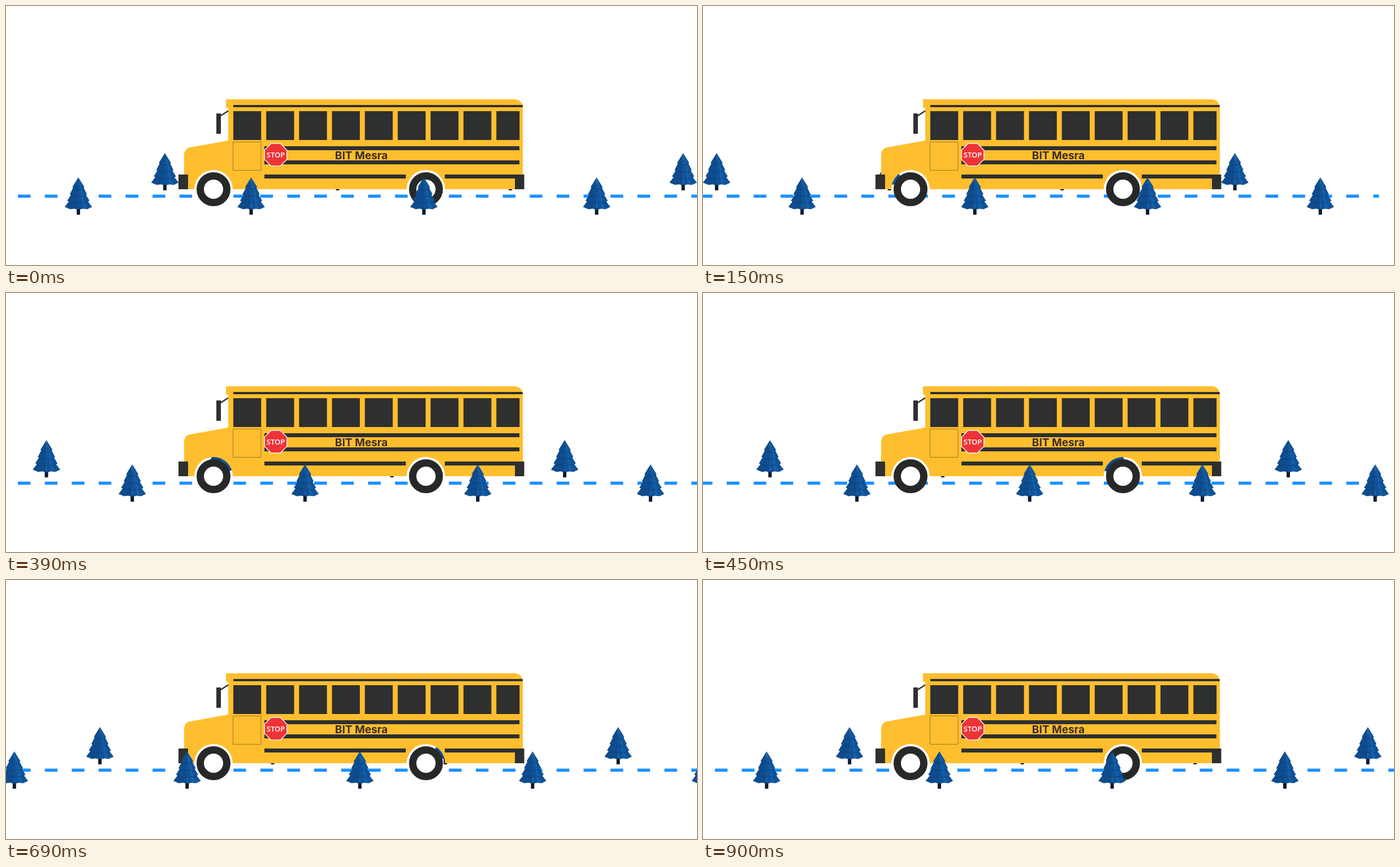
These frames come from a looping animation (1222x458 px, 1050 ms). An HTML page:

```html
<!DOCTYPE html>
<html lang="en">
<head>
<meta charset="utf-8">
<title>School bus</title>
<style>
  html, body { margin: 0; width: 100%; height: 100%; overflow: hidden; background: #fff; }
  svg { display: block; }
  .dark { fill: #2e302f; }
</style>
</head>
<body>
<svg width="1222" height="458" viewBox="0 0 1222 458">
  <defs>
    <g id="tree">
      <path d="M-3 54H3V66H-3Z" fill="#0b1a2e"/>
    </g>
  </defs>

  <g id="back"></g>
  <path id="road" d="M21 336.3H1222" stroke="#1e90ff" stroke-width="5.6" stroke-dasharray="22.4 25.24"/>

  <g id="bus">
    <path fill="#ffbe2e" d="M389 165H901Q911 166 914 177V324H776.5A34 34 0 0 0 708.5 324H401
      A34 34 0 0 0 333 324H315V264Q315 252 326 250L393 238V180H389Z"/>
    <path d="M379 194.500L393 185.500" stroke="#2e302f" stroke-width="2.500"/>
    <g class="dark">
      <path d="M372 190H380V226H372Z"/>
      <path d="M402 175H913.500L914 179H402Z"/>
      <path d="M457 248H908V255H457ZM457 273H908V280H457Z"/>
      <path d="M457 298H707V305H457ZM776 298H908V305H776Z"/>
      <path d="M305 298H322V324H305ZM900 298H916.500V324H900Z"/>
      <g id="windows"></g>
    </g>
    <path d="M401.500 240.500H451V290.500H401.500Z" fill="none" stroke="#9c772b"/>
    <path d="M468.700 243.200H485.300L496.800 254.700V271.300L485.300 282.800H468.700L457.200 271.300V254.700Z"
      fill="#ee3338" stroke="#fff" stroke-width="1.300"/>
    <text x="477" y="267.600" text-anchor="middle" fill="#fff"
      font-family="'Open Sans', sans-serif" font-weight="600" font-size="13">STOP</text>
    <text x="628.500" y="271" text-anchor="middle" fill="#3a2d26"
      font-family="Inter, sans-serif" font-weight="700" font-size="19">BIT Mesra</text>
    <g fill="#fff" stroke="#272929" stroke-width="13">
      <circle cx="367" cy="324" r="23.500"/>
      <circle cx="742.700" cy="324" r="23.500"/>
    </g>
  </g>

  <g id="front"></g>
</svg>

<script>
const $ = id => document.getElementById(id);

function add(parent, tag, attrs) {
  const el = document.createElementNS('http://www.w3.org/2000/svg', tag);
  for (const name in attrs) el.setAttribute(name, attrs[name]);
  parent.append(el);
}

// Tiers of the tree from the ground up: top, half width, hem.
const tiers = [[33, 24, 54], [22, 19.5, 43], [12, 15, 31.500], [0, 10.500, 19]];
for (const [top, w, hem] of tiers) {
  const shape = (points, fill) => add($('tree'), 'path', { d: `M${points}Z`, fill });
  const neck = top ? w * 0.4 : 0;
  shape(`${-neck} ${top}L${-w} ${hem - 2}L${-w * 0.6} ${hem + 2}L${-w * 0.3} ${hem + 1}L0 ${hem + 3}L0 ${top}`, '#0e4c8e');
  shape(`0 ${top}L0 ${hem + 3}L${w * 0.35} ${hem + 1}L${w * 0.65} ${hem + 2}L${w} ${hem - 2}L${neck} ${top}`, '#115398');
  shape(`${neck * 0.4} ${top}L${w * 0.35} ${hem + 1}L${w * 0.65} ${hem + 2}`, '#1560a8');
  add($('tree'), 'path', {
    d: `M${-w} ${hem - 2}L${-w * 0.6} ${hem + 2}L${-w * 0.3} ${hem + 1}L0 ${hem + 3}L${w * 0.35} ${hem + 1}L${w * 0.65} ${hem + 2}L${w} ${hem - 2}`,
    fill: 'none', stroke: '#0b3c74', 'stroke-width': 0.7
  });
}

for (let i = 0; i < 9; i++)
  add($('windows'), 'rect', { x: 402 + 58.15 * i, y: 186, width: i < 8 ? 49.3 : 41, height: 51 });

const gap = 305.5;
for (const row of ['back', 'front'])
  for (let i = -2; i < 5; i++) add($(row), 'use', { href: '#tree', x: gap * i });

const step = 150, steps = 7;
const frontX = [128, 175.2, 223.3, 272.2, 320.3, 370, 418];
const backX = [281, 329.6, 377, 424, 471.6, 519.6, 564.7];
const move = (id, x, y) => $(id).setAttribute('transform', `translate(${x} ${y})`);

const start = performance.now();
function draw(now) {
  // The scene advances in held steps.
  const n = Math.floor(Math.max(0, now - start) / step) % steps;
  move('back', backX[n], 260);
  move('front', frontX[n], 303);
  move('road', n % 2 ? -26.7 : 0, 0);
  requestAnimationFrame(draw);
}
draw(start);
</script>
</body>
</html>
```
